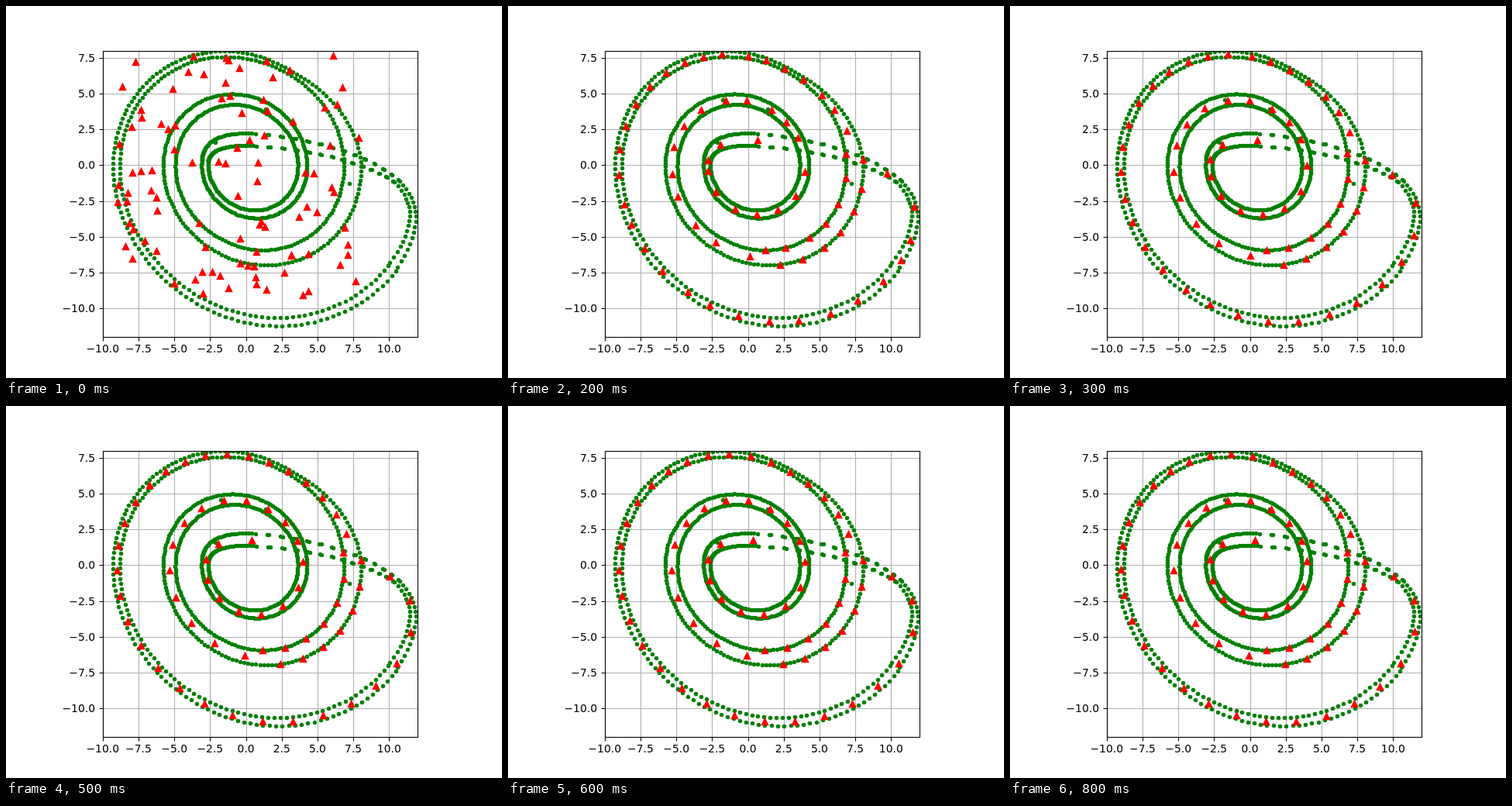
Animation, 640 px wide and 480 px high, one loop 900 ms. Source, as an HTML page:

```html
<!DOCTYPE html>
<html lang="en">
<head>
<meta charset="utf-8">
<title>Cluster centres on a spiral orbit</title>
<style>
  html, body { margin: 0; width: 100%; height: 100%; overflow: hidden; background: #fff; }
  svg { display: block; width: 100vw; height: 100vh; }
  text { font: 13.89px "DejaVu Sans", sans-serif; }
</style>
</head>
<body>
<svg viewBox="0 0 640 480">
  <clipPath id="area"><rect x="125" y="58" width="407" height="370"/></clipPath>
  <path id="grid" stroke="#b0b0b0" stroke-width="1.1"/>
  <g clip-path="url(#area)">
    <g id="dots" fill="#008000"></g>
    <path id="centres" fill="red" stroke="red" stroke-width="1.39" stroke-miterlimit="9"/>
  </g>
  <path id="ticks" stroke="#000" stroke-width="1.1"/>
  <rect x="125.5" y="58.5" width="406" height="369" fill="none" stroke="#000" stroke-width="1.1"/>
  <g id="labels"></g>
</svg>
<script>
const $ = id => document.getElementById(id);
const UNIT = 18.48, STEP_MS = 100, STEPS = 9, RAD = Math.PI / 180;
const px = x => 309.52 + UNIT * x;
const py = y => 205.44 - UNIT * y;
const snap = v => Math.floor(v + 0.5) + 0.5;
const range = n => Array.from({ length: n }, (_, i) => i);

function random(seed) {
  const v = Math.sin(seed * 127.1 + 3.7) * 43758.5453;
  return v - Math.floor(v);
}

// Axes
let grid = '', ticks = '', labels = '';
const label = v => v.toFixed(1).replace('-', '\u2212');
for (let v = -10; v <= 10; v += 2.5) {
  const x = snap(px(v)), y = snap(py(v));
  grid += `M${x} 58V427`;
  ticks += `M${x} 427.5v5`;
  labels += `<text x="${px(v)}" y="447" text-anchor="middle">${label(v)}</text>`;
  if (v > 8) continue;
  grid += `M125 ${y}H531`;
  ticks += `M125.5 ${y}h-5`;
  labels += `<text x="115" y="${Math.round(py(v) + 5)}" text-anchor="end">${label(v)}</text>`;
}
$('grid').setAttribute('d', grid);
$('ticks').setAttribute('d', ticks);
$('labels').innerHTML = labels;

// Orbit: two strands, each a growing coil that bends round and returns to the middle
const strands = [
  {
    size: 3.66, fold: 0.047, foldFrom: 380, foldTo: 460,
    entry: [[323, 181], [284, 178], [262, 187], [261.7, 200.7]],
    bend: [[495.7, 331.7], [511, 311], [521, 290], [521.5, 271]],
    turn: [[521.5, 271], [521.5, 255], [516, 243], [501, 227]],
    back: [[501, 227], [465, 204], [405, 186], [323, 181]]
  },
  {
    size: 4.3, fold: 0.145, foldFrom: 360, foldTo: 435,
    entry: [[322, 165], [276, 162], [253.5, 176], [253.3, 199.8]],
    bend: [[505.7, 337.8], [520, 314], [529, 292], [529.5, 271]],
    turn: [[529.5, 271], [529, 255], [521, 240], [508, 226]],
    back: [[508, 226], [470, 192], [400, 172], [322, 165]]
  }
];

function coil(strand, deg) {
  const a = deg * RAD;
  const u = Math.min(1, Math.max(0, (deg - strand.foldFrom) / (strand.foldTo - strand.foldFrom)));
  const folded = 1 - strand.fold * u * u * (3 - 2 * u);
  const squeezed = 1 - 0.0175 * (1 + Math.cos(a - 135 * RAD));
  const r = strand.size * Math.exp(0.1005 * a) * folded * squeezed;
  return [px(r * Math.cos(a)), py(r * (0.995 * Math.sin(a) - 0.1 * Math.cos(a)))];
}

function bezier([a, b, c, d], t) {
  const s = 1 - t;
  return [0, 1].map(k =>
    s * s * s * a[k] + 3 * s * s * t * b[k] + 3 * s * t * t * c[k] + t * t * t * d[k]);
}

const dots = [[277, 121], [335, 133], [443, 229], [270, 176]];
for (const strand of strands) {
  const sample = (part, count, ease = t => t) =>
    range(count).forEach(i => dots.push(bezier(strand[part], ease(i / count))));
  sample('entry', 45, t => 1 - (1 - t) ** 1.5);
  for (let deg = -180; deg < 690; deg += 2.28) dots.push(coil(strand, deg));
  sample('bend', 9);
  sample('turn', 8);
  sample('back', 13);
  sample('back', 13, t => t + 0.012);
}
$('dots').innerHTML = dots.map(([x, y]) =>
  `<circle cx="${Math.floor(x) + 0.5}" cy="${Math.floor(y) + 0.5}" r="2.75"/>`).join('');

// Centres: evenly spread over stretches of one strand or of the line midway between both
const midway = place => v => {
  const [a, b] = strands.map(strand => place(strand, v));
  return [(a[0] + b[0]) / 2, (a[1] + b[1]) / 2];
};
const along = part => midway((strand, t) => bezier(strand[part], t));

const stretches = [
  { place: along('entry'), from: 0.05, to: 0.95, count: 3, drift: 0 },
  { place: midway(coil), from: -153, to: 10, count: 7, drift: -11 },
  { place: midway(coil), from: 30, to: 269, count: 13, drift: 1 },
  { place: v => coil(strands[0], v), from: 281, to: 373, count: 7, drift: 0 },
  { place: v => coil(strands[1], v), from: 290, to: 368, count: 7, drift: 0 },
  { place: midway(coil), from: 382.5, to: 691, count: 29, drift: 3 },
  { place: along('bend'), from: 0.67, to: 0.67, count: 1, drift: -0.18 },
  { place: along('turn'), from: 0.45, to: 0.45, count: 1, drift: -0.2 },
  { place: along('back'), from: 0.08, to: 0.08, count: 1, drift: 0.05 }
];

const spread = unrest => stretches.flatMap(({ place, from, to, count, drift }, s) => {
  const gap = (to - from) / Math.max(1, count - 1);
  return range(count).map(i => {
    const jitter = gap * 0.3 * (random(50 * s + i) - 0.5);
    return place(from + gap * i + unrest * (drift + jitter));
  });
});

const scatter = range(96).map(i => [142 + 314 * random(2 * i + 500), 61 + 312 * random(2 * i + 501)]);

// Centres outside the orbit win no data and stay for one more step
const idle = scatter.filter(([x, y]) =>
  (x - 310) * (y - 205) < 0 && Math.hypot(x - 310, y - 205) > 160 &&
  dots.every(d => Math.hypot(x - d[0], y - d[1]) > 14));

function pose(step) {
  if (step === 0) return scatter;
  const centres = spread(2 * 0.45 ** (step - 1));
  return step === 1 ? [...idle, ...centres] : centres;
}

const triangle = ([x, y]) => `M${Math.round(x) + 0.5} ${Math.round(y) - 3.67}l4.17 8.33h-8.33z`;
const poses = range(STEPS).map(step => pose(step).map(triangle).join(''));

let shown = -1;
function draw() {
  const step = Math.floor(performance.now() / STEP_MS) % STEPS;
  if (step !== shown) $('centres').setAttribute('d', poses[shown = step]);
  requestAnimationFrame(draw);
}
draw();
</script>
</body>
</html>
```
